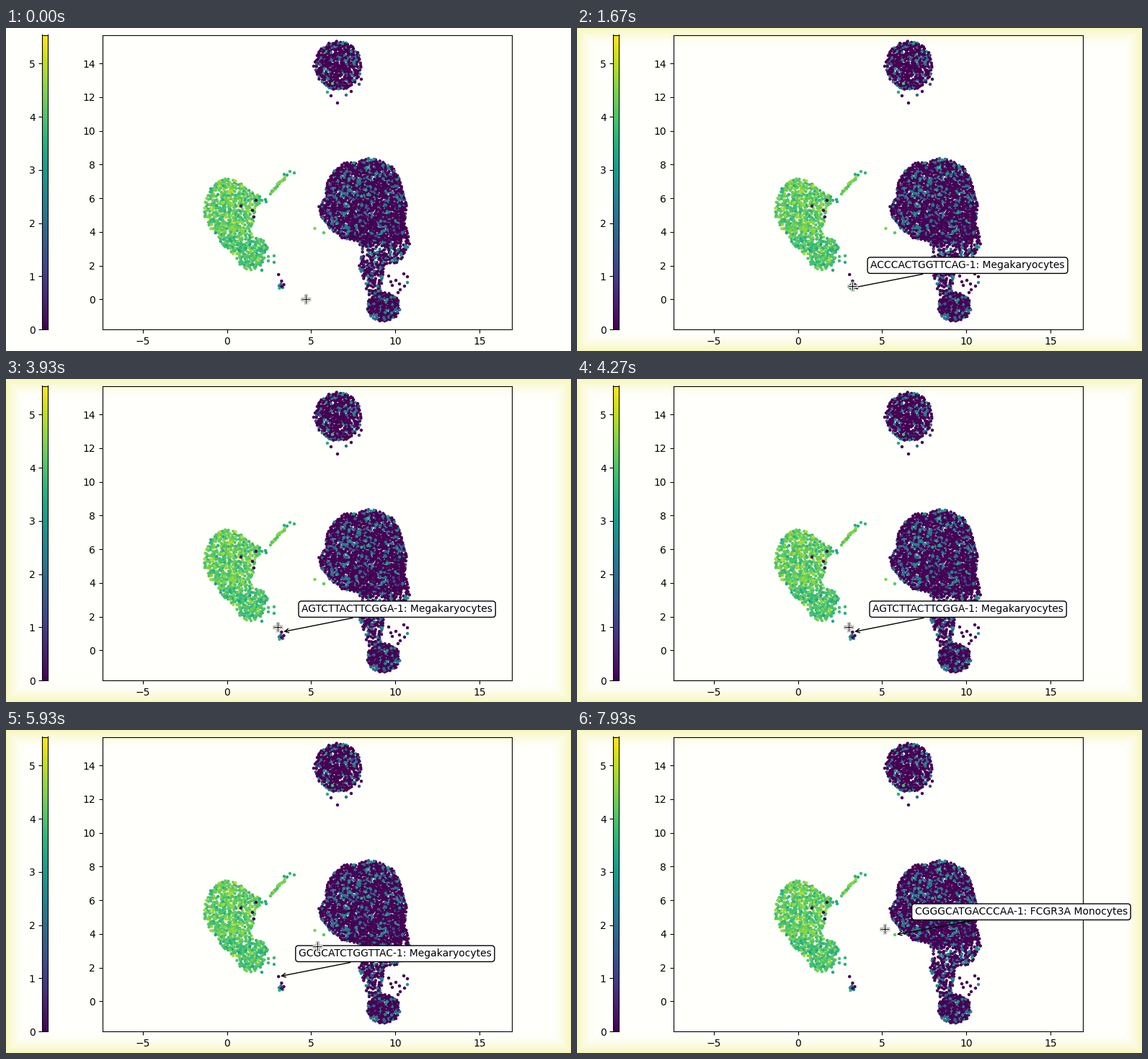
Animation, 784 px wide and 448 px high, one loop 8 s. Source, as a matplotlib script:

```python
import numpy as np
import matplotlib.pyplot as plt
from matplotlib.animation import FuncAnimation
from matplotlib.path import Path

W, H, DPI = 784, 448, 100
LOOP, TICK = 8000, 50
STEP = 1000 / 15                      # the screen refreshes 15 times a second
LEFT, RIGHT, TOP, BOTTOM = 133.5, 701.5, 9.5, 418
X0, Y0, UNIT = 306.6, 376.3, 23.37    # pixel place of (0, 0) and pixels per unit
VMAX = 5.54
PT = 72 / DPI                         # one pixel in points

rng = np.random.default_rng(11)
plt.rcParams["font.family"] = "DejaVu Sans"


def to_data(p):
    p = np.asarray(p, float)
    return np.column_stack([(p[:, 0] - X0) / UNIT, (Y0 - p[:, 1]) / UNIT])


def ellipse(cx, cy, rx, ry):
    a = np.linspace(0, 2 * np.pi, 40)
    return np.column_stack([cx + rx * np.cos(a), cy + ry * np.sin(a)])


def fill(outline, n, gap):
    """Scatter up to n points inside an outline, at least gap pixels apart."""
    outline = np.asarray(outline, float)
    cand = rng.uniform(outline.min(0), outline.max(0), (n * 9, 2))
    cand = cand[Path(outline).contains_points(cand)]
    kept = np.empty((n, 2))
    count = 0
    for c in cand:
        if count == n:
            break
        d = kept[:count] - c
        if count == 0 or (d * d).sum(1).min() > gap * gap:
            kept[count] = c
            count += 1
    return kept[:count]


def sparse(n):
    """Mostly zero expression, with some middling values."""
    v = np.clip(rng.normal(2.1, 0.5, n), 1.1, 3.6)
    return np.where(rng.random(n) < 0.75, 0, v)


def strong(p):
    """High expression, a little lower towards the bottom of the cluster."""
    mean = np.where(p[:, 1] > 292, 3.95, 4.15)
    return np.clip(rng.normal(mean, 0.38), 3.0, 5.3)


def build_cells():
    green = [(293, 212), (309, 208), (324, 214), (336, 224), (351, 232),
             (353, 242), (346, 253), (344, 268), (338, 280), (343, 291),
             (357, 293), (363, 304), (358, 320), (353, 331), (340, 336),
             (326, 332), (318, 316), (303, 303), (290, 288), (281, 273),
             (273, 256), (277, 238), (284, 222)]
    body = [(503, 180), (520, 184), (538, 194), (546, 210), (552, 228),
            (556, 248), (553, 268), (555, 282), (545, 294), (520, 297),
            (490, 297), (466, 291), (447, 276), (438, 262), (434, 248),
            (443, 236), (444, 218), (453, 200), (470, 187), (488, 185)]
    tail = [(488, 290), (520, 292), (555, 274), (561, 297), (553, 314),
            (547, 325), (527, 327), (523, 345), (519, 370), (502, 370),
            (497, 350), (489, 334), (494, 312)]
    dark_strays = [(460, 104), (427, 53), (429, 47), (451, 94), (472, 93),
                   (479, 88), (490, 78), (493, 71), (503, 181), (557, 345),
                   (552, 341), (541, 350), (544, 367), (557, 353), (534, 352),
                   (536, 357), (546, 355), (547, 363), (553, 358), (531, 344)]
    green_strays = [(372, 316), (372, 325), (364, 317), (364, 323), (355, 336),
                    (352, 234), (360, 238), (355, 239), (361, 241),
                    (386, 203), (390, 204), (394, 199), (400, 201)]

    along = np.linspace(0, 1, 20)
    streak = np.column_stack([367 + 20 * along, 229 - 21 * along])
    streak += rng.normal(0, 0.9, streak.shape)

    groups = []
    for outline, n, gap in [(ellipse(461, 52, 32, 34), 350, 2.2),
                            (body, 1200, 2.2), (tail, 310, 2.1),
                            (ellipse(524, 387, 23, 20), 180, 2.1)]:
        p = fill(outline, n, gap)
        groups.append((p, sparse(len(p))))
    p = fill(green, 620, 1.9)
    groups.append((p, strong(p)))
    groups.append((np.array(dark_strays), sparse(len(dark_strays))))
    groups.append((np.array(green_strays),
                   rng.uniform(3.2, 4.1, len(green_strays))))
    groups.append((streak, rng.uniform(3.9, 4.8, len(streak))))

    # single cells: x, y, value
    singles = np.array([
        (326, 247, 0), (342, 253, 0), (347, 239, 0), (344, 262, 0),
        (428.5, 278, 4.5), (441, 284, 4.1), (446, 89, 3.4), (453, 77, 3.9),
        (378.2, 342, 0), (382.4, 351, 0), (385.5, 356, 0), (381.5, 355, 2),
        (379.5, 361, 3.6), (384, 360, 2.6), (379, 357.5, 2.4), (382.5, 358.5, 0)])
    groups.append((singles[:, :2], singles[:, 2]))
    return np.vstack([g[0] for g in groups]), np.concatenate([g[1] for g in groups])


def glow_image():
    y, x = np.mgrid[0:H, 0:W]
    d = np.minimum(np.minimum(x, W - 1 - x), np.minimum(y, H - 1 - y))
    a = np.clip(1 - d / 26, 0, 1) ** 1.7
    img = np.ones((H, W, 4))
    img[..., :3] = np.array([247, 247, 188]) / 255
    img[..., 3] = a
    return img


def full_axes(z):
    a = fig.add_axes([0, 0, 1, 1], zorder=z)
    a.set(xlim=(0, W), ylim=(H, 0))
    a.axis("off")
    return a


def pixel_axes(left, right, z=2):
    return fig.add_axes([left / W, 1 - BOTTOM / H,
                         (right - left) / W, (BOTTOM - TOP) / H], zorder=z)


fig = plt.figure(figsize=(W / DPI, H / DPI), dpi=DPI, facecolor="#fffffb")

back = full_axes(0)
glow = back.imshow(glow_image(), extent=(0, W, H, 0), aspect="auto",
                   interpolation="nearest")

bar = pixel_axes(50.5, 58.5)
bar.imshow(np.linspace(0, 1, 256)[:, None], cmap="viridis", origin="lower",
           extent=(0, 1, 0, VMAX), aspect="auto")
bar.set(xticks=[], yticks=range(6))

ax = pixel_axes(LEFT, RIGHT, 3)
ax.patch.set_visible(False)
cells, values = build_cells()
pos = to_data(cells)
ax.scatter(pos[:, 0], pos[:, 1], c=values, cmap="viridis", vmin=0, vmax=VMAX,
           s=10, linewidths=0)
ax.set(xlim=((LEFT - X0) / UNIT, (RIGHT - X0) / UNIT),
       ylim=((Y0 - BOTTOM) / UNIT, (Y0 - TOP) / UNIT),
       xticks=range(-5, 16, 5), yticks=range(0, 15, 2))

note = ax.annotate("", xy=(0, 0), xytext=(20, 20), textcoords="offset points",
                   bbox=dict(boxstyle="round", fc="w"),
                   arrowprops=dict(arrowstyle="->"), zorder=10)

top = full_axes(5)
cursor = [top.plot([0], [0], "+", color=c, ms=size * PT, mew=width * PT)[0]
          for c, size, width in [("#a0a096", 14, 4.8), ("white", 13, 3),
                                 ("black", 12, 1)]]

# cursor path: step, x, y
PATH = np.array([
    (0, 416, 376), (12, 416, 376), (15, 406, 378), (18, 391, 373),
    (22, 384, 363), (25, 382, 358), (44, 382, 358), (45, 382, 357),
    (49, 382, 357), (54, 381, 351), (59, 377, 344), (75, 377, 344),
    (77, 378, 339), (80, 385, 323), (84, 408, 311), (88, 431, 302),
    (93, 438, 291), (98, 441, 283), (114, 441, 283), (119, 427, 276)])

# first step, cell in pixels, label
NOTES = [
    (22, (379.5, 361), "ACCCACTGGTTCAG-1: Megakaryocytes"),
    (54, (382.4, 351), "AGTCTTACTTCGGA-1: Megakaryocytes"),
    (76, (378.2, 342), "GCGCATCTGGTTAC-1: Megakaryocytes"),
    (96, (441, 284), "CGGGCATGACCCAA-1: FCGR3A Monocytes"),
]


def update(i):
    step = int((i * TICK + TICK - 1) / STEP)
    glow.set_visible(step >= 2)

    x, y = (round(np.interp(step, PATH[:, 0], PATH[:, k])) + 0.5 for k in (1, 2))
    for layer in cursor:
        layer.set_data([x], [y])

    shown = [n for n in NOTES if n[0] <= step]
    note.set_visible(bool(shown))
    if shown:
        _, cell, label = shown[-1]
        note.xy = tuple(to_data([cell])[0])
        note.set_text(label)
    return [glow, note, *cursor]


anim = FuncAnimation(fig, update, frames=LOOP // TICK, interval=TICK,
                     repeat=True, repeat_delay=0, blit=False)
plt.show()
```
